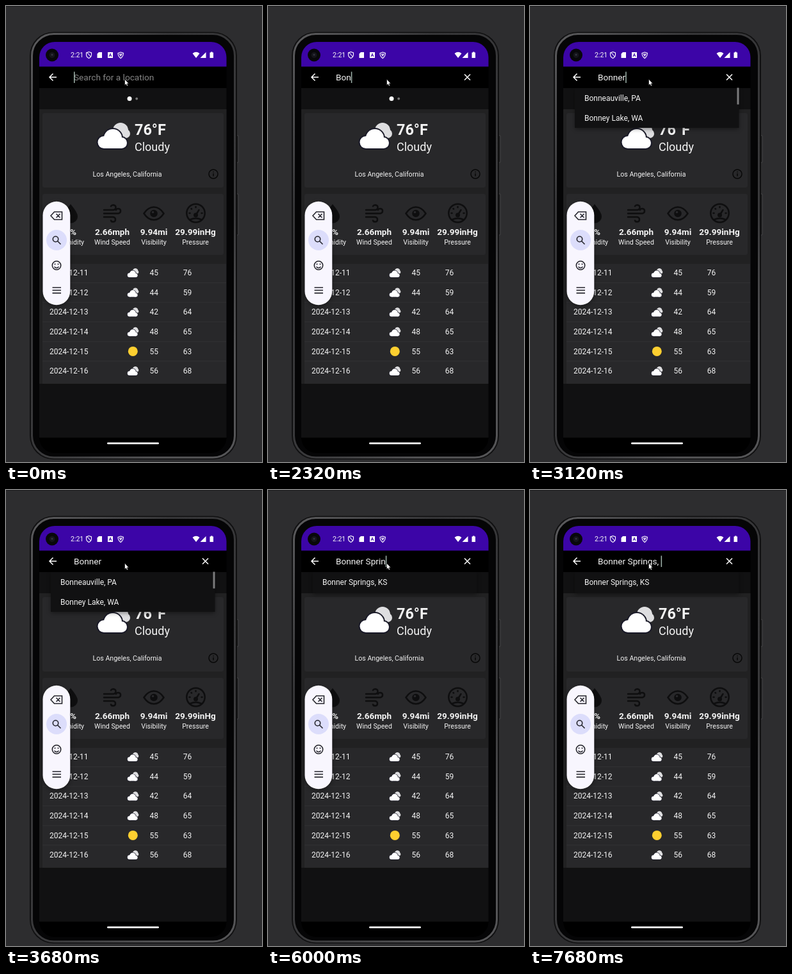
An HTML page that plays this animation: 400x711 px, repeating every 8 s.

```html
<!DOCTYPE html>
<html lang="en">
<head>
<meta charset="utf-8">
<title>Weather search</title>
<style>
html, body { margin: 0; width: 100%; height: 100%; overflow: hidden; background: #2d2d2f; }
svg { display: block; width: 400px; height: 711px; }
text { font-family: Roboto, sans-serif; fill: #f4f4f4; white-space: pre; }
.mid { text-anchor: middle; }
.bold { font-weight: 700; }
.ink { fill: none; stroke: #0e0e0f; stroke-width: 2.5; stroke-linecap: round; }
.tool { fill: none; stroke: #25252c; stroke-width: 1.6; }
</style>
</head>
<body>
<svg viewBox="0 0 400 711">
  <defs>
    <linearGradient id="rim" x2=".6" y2="1">
      <stop offset="0" stop-color="#5c5c5e"/><stop offset=".3" stop-color="#363638"/>
      <stop offset=".75" stop-color="#39393b"/><stop offset="1" stop-color="#555557"/>
    </linearGradient>
    <filter id="shadow" x="-30%" y="-30%" width="160%" height="160%" color-interpolation-filters="sRGB">
      <feDropShadow dx="0" dy="2" stdDeviation="3" flood-opacity=".4"/>
    </filter>
    <clipPath id="screen"><rect x="52" y="56" width="292.5" height="641" rx="24"/></clipPath>
    <g id="front">
      <circle cx="153" cy="212.5" r="9.5"/><circle cx="167" cy="206" r="14"/>
      <circle cx="180.500" cy="213.500" r="8.5"/><rect x="153" y="208" width="28" height="14"/>
    </g>
    <g id="cloud">
      <g fill="#dedee0"><circle cx="179" cy="194" r="12"/><circle cx="187" cy="199" r="7"/><rect x="170" y="197" width="17" height="9"/></g>
      <use href="#front" fill="#fff" stroke="#1a1a28" stroke-width="4"/>
      <use href="#front" fill="#fff"/>
    </g>
  </defs>

  <rect width="400" height="711" fill="#2d2d2f"/>
  <rect width="400" height="1" fill="#1c1c1d"/>

  <!-- phone body -->
  <g fill="#1a1a1b" stroke="#555557" stroke-width=".7">
    <rect x="360" y="202" width="3" height="42" rx="1"/><rect x="360" y="293" width="3" height="64" rx="1"/>
  </g>
  <rect x="37" y="40.500" width="324" height="666.500" rx="37" fill="#101011"/>
  <rect x="40.500" y="43.500" width="317" height="660.500" rx="34" fill="#050506" stroke="url(#rim)" stroke-width="3"/>

  <!-- screen -->
  <g clip-path="url(#screen)">
    <rect x="52" y="56" width="293" height="641" fill="#000"/>
    <rect x="52" y="56" width="293" height="38.500" fill="#3c05a7"/>
    <rect x="52" y="128" width="293" height="545" fill="#111112"/>
    <rect x="52" y="161" width="293" height="428" fill="#212122"/>
    <g fill="#28282a">
      <rect x="57" y="167" width="283" height="116" rx="3"/>
      <rect x="57" y="293" width="283" height="95" rx="3"/>
      <rect x="57" y="402" width="287" height="187"/>
    </g>
  </g>
  <rect x="158" y="680.500" width="81" height="2.800" rx="1.400" fill="#fff"/>
  <circle cx="72" cy="76.500" r="10" fill="#08080a"/>
  <circle cx="72" cy="76.500" r="4.500" fill="#15151b"/><circle cx="72" cy="76" r="1.500" fill="#34343f"/>

  <!-- status bar -->
  <text x="101" y="80" font-size="10.5">2:21</text>
  <g fill="none" stroke="#fff" stroke-width="1.100">
    <path d="M129.500 71.500l4 1.500v3q0 3.500-4 5.500-4-2-4-5.500v-3zM127 73l5.500 6"/>
    <path d="M175 73.500l4.200-1.500 4.200 1.500q0 5-4.200 8-4.200-3-4.200-8zM177.500 75h3.500l-1.800 3z"/>
  </g>
  <path d="M145 72h5v9h-7.500v-6.500zM159 72h8v9h-8zM291.500 74q5.500-4.500 11 0l-5.500 7zM303.500 81h9v-9z" fill="#fff"/>
  <path d="M161 79l2-5 2 5M162 77.500h2" fill="none" stroke="#3c05a7"/>
  <path d="M318.500 72.500h1.500v-1h2.500v1h1.500v8.500h-5.500z" fill="#fff"/>

  <!-- search bar -->
  <path d="M79 111H68.500M73.500 105.500L68 111l5.500 5.500" fill="none" stroke="#fff" stroke-width="1.500"/>
  <path id="clear" d="M307 106.500l9 9m0-9l-9 9" stroke="#fff" stroke-width="1.500"/>
  <text id="query" x="106" y="116" font-size="13.65"></text>
  <rect id="caret" y="102.500" width="1.500" height="17.500" fill="#a0b4ac"/>
  <circle cx="193" cy="144.500" r="3.500" fill="#fff"/><circle cx="204.200" cy="144.500" r="1.900" fill="#777"/>

  <!-- current weather -->
  <use href="#cloud"/>
  <text class="bold" x="201" y="200.500" font-size="23.4">76°F</text>
  <text x="201" y="225.500" font-size="18">Cloudy</text>
  <text class="mid" x="189.500" y="266" font-size="10.6">Los Angeles, California</text>
  <g fill="none" stroke="#080808" stroke-width="1.500"><circle cx="324" cy="262" r="7"/><path d="M324 261v4.500M324 258v1.500"/></g>

  <!-- detail icons -->
  <path d="M101 309q11 13 11 19a11 10.500 0 0 1-22 0q0-6 11-19z" fill="#0e0e0f"/>
  <path class="ink" d="M153 318h14.500q4-.5 4-4t-4-3.800q-2.500 0-3.500 2M153 323.500h22q4-.5 4-4t-4-3.500q-2.500 0-3.200 2M153 329h14q4 .5 4 4t-3.800 3.500q-2.500 0-3.200-2"/>
  <path class="ink" d="M215.500 323.500q6.500-10 15.500-10t15.500 10q-6.500 10-15.500 10t-15.500-10z"/>
  <circle cx="231" cy="323.500" r="5.800" fill="#0e0e0f"/><circle cx="229.500" cy="321.500" r="1.800" fill="#28282a"/>
  <circle class="ink" cx="296.500" cy="323" r="14.200"/>
  <path class="ink" d="M288 333q8.500-4 17 0M296.500 326l5-8M286.500 323h1M289.500 316l.5.500M296.500 313v1M305.500 323h1"/>
  <circle cx="296.500" cy="326" r="3.500" fill="#0e0e0f"/>

  <g id="details"></g>
  <g id="forecast"></g>

  <!-- suggestions -->
  <g id="drop">
    <rect id="panel" x="70" y="128" width="256.500" fill="#111112" filter="url(#shadow)"/>
    <text id="first" x="85" y="148" font-size="12"></text>
    <text id="second" x="85" y="179" font-size="12"></text>
    <rect id="bar" x="323.500" y="127.500" width="3" fill="#7b7b7c"/>
  </g>
  <path d="M185.500 114v9.500l2-1.700 1.500 3 1.600-.8-1.500-3h2.800z" fill="#fff" stroke="#111" stroke-width=".7"/>

  <!-- floating toolbar -->
  <rect x="57.500" y="304.800" width="42.800" height="161.400" rx="21.400" fill="#f8f6fe" filter="url(#shadow)"/>
  <circle cx="79" cy="365" r="16" fill="#dcddfb"/>
  <g class="tool">
    <path d="M75.500 321h12v12h-12l-5.500-6zM78.500 324l6 6m0-6l-6 6"/>
    <circle cx="77.500" cy="363.500" r="4.200"/><path d="M80.500 366.500l5 5"/>
    <circle cx="79" cy="404.500" r="6.700"/><path d="M75.500 406.500q3.500 4 7 0M76.500 401.500v2M81.500 401.500v2"/>
    <path d="M72.500 439h13.500M72.500 443.300h13.500M72.500 447.600h13.500"/>
  </g>
</svg>
<script>
const $ = id => document.getElementById(id);
const LOOP = 8000;
const CITY = 'Bonner Springs, ';
// times at which each letter of CITY is typed
const KEYS = [1080, 1720, 2120, 2480, 2920, 3080, 3920, 4480, 4920, 5160, 5400, 5680, 6080, 6400, 7320, 7680];
const CARET_OFF = [[520, 1000], [3680, 3920], [6920, 7320]];
// start, rows, scrollbar height
const LISTS = [
  [2680, ['Bonn, Germany'], 6.5],
  [3000, ['Bonneauville, PA', 'Bonney Lake, WA'], 26],
  [4160, ['Bonner Springs, KS'], 0],
  [4480, ['Bonner Springs, KS'], 6.5]
];

const label = (x, y, size, cls, s) => `<text x="${x}" y="${y}" font-size="${size}" class="mid ${cls}">${s}</text>`;

$('details').innerHTML = [
  [101, '9%', 'Humidity'], [166, '2.66mph', 'Wind Speed'],
  [231, '9.94mi', 'Visibility'], [296, '29.99inHg', 'Pressure']
].map(([x, value, name]) => label(x, 357, 13.5, 'bold', value) + label(x, 372, 10.6, '', name)).join('');

$('forecast').innerHTML = [[45, 76], [44, 59], [42, 64], [48, 65], [55, 63], [56, 68]].map(([low, high], i) => {
  const y = 416 + i * 30.6;
  const icon = i === 4
    ? `<circle cx="198.300" cy="${y}" r="7.500" fill="#fdcf30"/>`
    : `<use href="#cloud" transform="translate(139.500 ${y - 70.7}) scale(.35)"/>`;
  const line = i < 5 ? `<rect x="57" y="${y + 15}" width="287" height=".8" fill="#343436"/>` : '';
  return line + icon + `<text x="68" y="${y + 4.2}" font-size="12">2024-12-${11 + i}</text>` +
    label(231.3, y + 4.2, 12, '', low) + label(283.5, y + 4.2, 12, '', high);
}).join('');

const show = (id, on) => $(id).setAttribute('visibility', on ? 'visible' : 'hidden');

function draw(t) {
  const typed = CITY.slice(0, KEYS.filter(k => k <= t).length);
  const query = $('query');
  query.textContent = typed;
  const width = typed ? query.getComputedTextLength() : 0;
  $('caret').setAttribute('x', 106 + width);
  show('caret', !CARET_OFF.some(([a, b]) => t >= a && t < b));
  show('clear', typed);
  if (!typed) query.textContent = 'Search for a location';
  query.style.fill = typed ? '#f4f4f4' : '#858585';

  const list = LISTS.filter(l => l[0] <= t).pop();
  show('drop', list);
  if (!list) return;
  const [, rows, bar] = list;
  $('panel').setAttribute('height', rows.length > 1 ? 62 : 33);
  $('first').textContent = rows[0];
  $('second').textContent = rows[1] || '';
  $('bar').setAttribute('height', bar);
  $('bar').setAttribute('opacity', Math.max(0, Math.min(1, (5880 - t) / 480)));
}

function tick() {
  draw(performance.now() % LOOP);
  requestAnimationFrame(tick);
}
tick();
</script>
</body>
</html>
```
